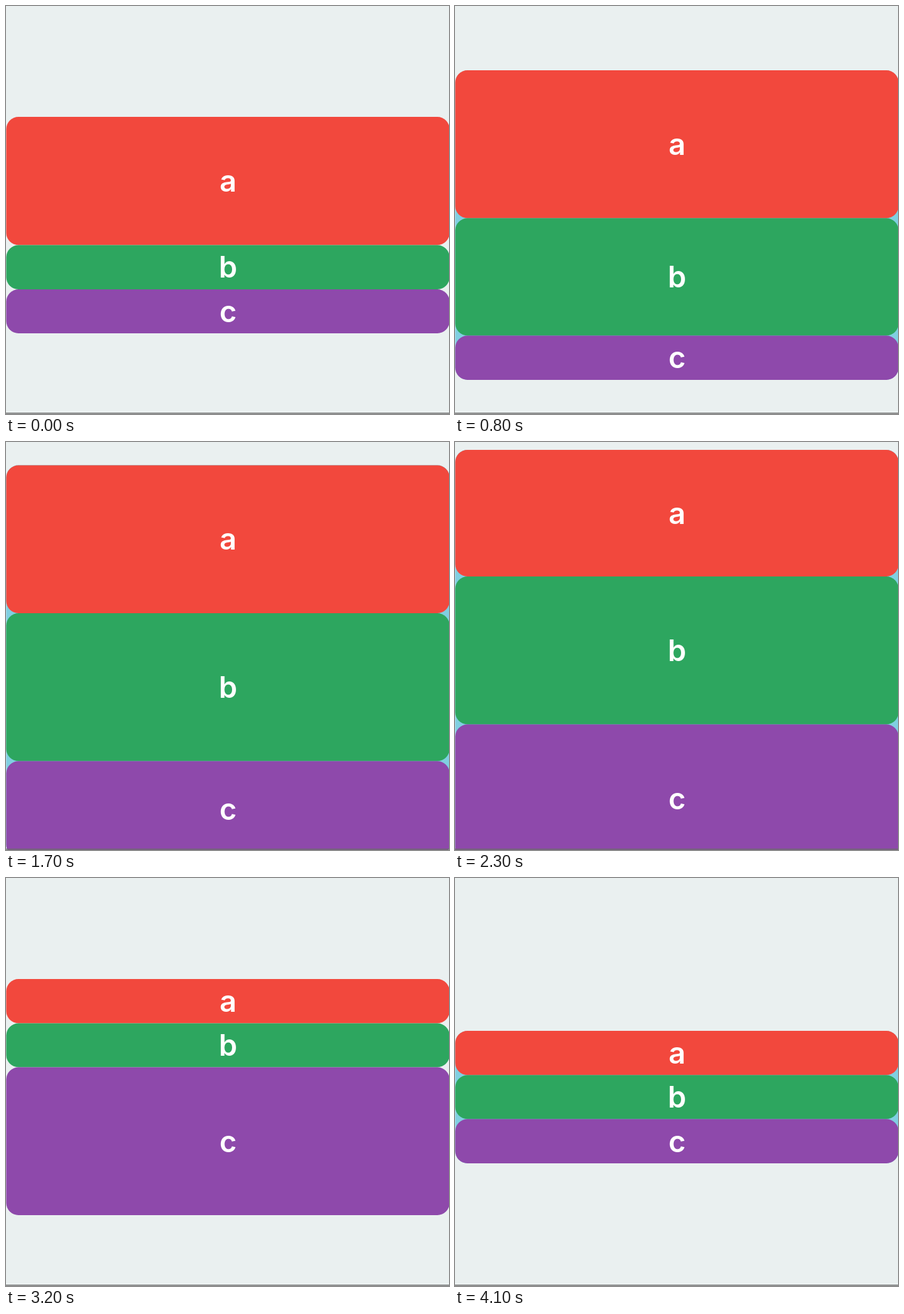
Animation, 674 px wide and 622 px high, one loop 4200 ms. Source, as an HTML page with a canvas:

```html
<!DOCTYPE html>
<html lang="en">
<head>
<meta charset="utf-8">
<style>
  html, body { margin: 0; width: 100%; height: 100%; overflow: hidden; background: #eaf0f0; }
  canvas { display: block; }
</style>
</head>
<body>
<canvas id="stage" width="674" height="622"></canvas>
<script>
const ctx = document.getElementById('stage').getContext('2d');
const LOOP = 4200, STEP = 100, EASE = 320;
const CLOSED = 67.2, OPEN = 225.5, MIDDLE = 334, RADIUS = 18.5;
const BACK = '#eaf0f0', GAP = '#80cfe1';

// open and close: when each row starts to grow and to shrink, in ms
const rows = [
  { label: 'a', color: '#f2483d', open: -231, close: 2207 },
  { label: 'b', color: '#2da65f', open: 595, close: 2840 },
  { label: 'c', color: '#8e49ab', open: 1540, close: 3780 }
];

function ramp(t, start) {
  const u = Math.min(1, Math.max(0, (t - start) / EASE));
  return u * u * (3 - 2 * u);
}

function card(top, bottom, color) {
  ctx.fillStyle = color;
  ctx.beginPath();
  ctx.roundRect(0.4, top, 674.4, bottom - top, RADIUS);
  ctx.fill();
}

function draw(t) {
  const heights = rows.map(r => CLOSED + (OPEN - CLOSED) * (ramp(t, r.open) - ramp(t, r.close)));
  const total = heights.reduce((sum, h) => sum + h, 0);
  const half = total / 2;
  let y = MIDDLE - half;

  ctx.fillStyle = BACK;
  ctx.fillRect(0, 0, 674, 622);
  // the gaps are pale while a single row is open
  const pale = t < 650 || (t > 2950 && t < 3850);
  card(y, y + total, pale ? BACK : GAP);

  ctx.font = '600 45px Inter, Roboto, sans-serif';
  ctx.textAlign = 'center';
  rows.forEach((row, i) => {
    const bottom = y + heights[i];
    // edges sit on half pixels at most
    card(Math.round(y * 2) / 2, Math.round(bottom * 2) / 2, row.color);
    ctx.fillStyle = '#fff';
    ctx.fillText(row.label, 337.8, (y + bottom) / 2 + 16.3);
    y = bottom;
  });

  ctx.fillStyle = '#6c6c6c';
  ctx.fillRect(0, 620, 674, 1.5);
}

const begin = performance.now();
function frame() {
  const t = (performance.now() - begin) % LOOP;
  draw(Math.floor(t / STEP) * STEP);
  requestAnimationFrame(frame);
}
frame();
</script>
</body>
</html>
```
